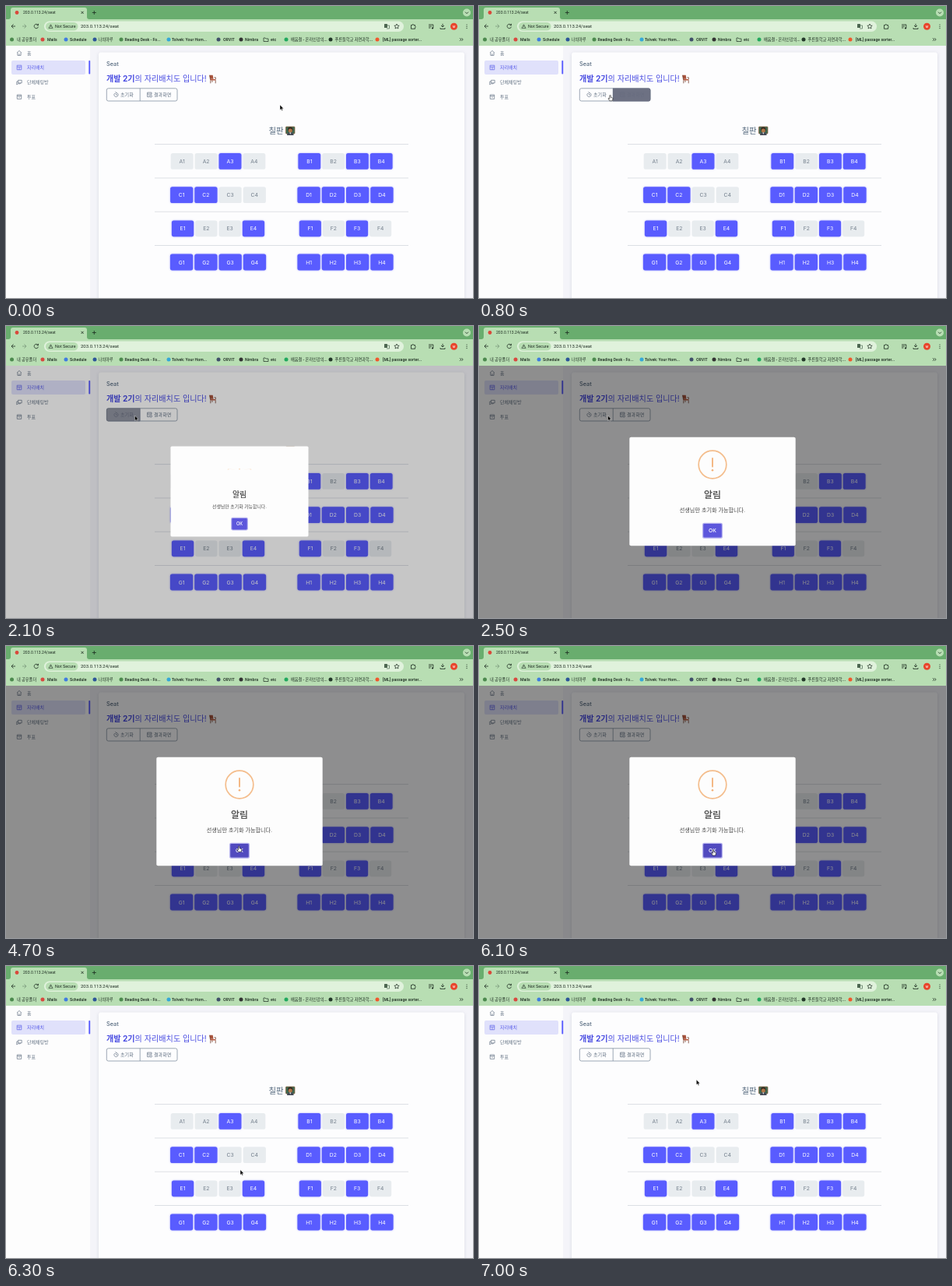
Write an HTML page that moves like this. It is 600 by 375 pixels and loops after 7700 ms.

```html
<!DOCTYPE html>
<html lang="ko">
<head>
<meta charset="utf-8">
<title>Seat</title>
<style>
html, body { margin: 0; width: 100%; height: 100%; overflow: hidden; background: #fff; }
svg { display: block; width: 100%; height: 100%; font-family: Inter, 'Noto Sans CJK KR', 'Noto Sans CJK', sans-serif; }
.chrome { font-family: Roboto, 'Noto Sans CJK KR', 'Noto Sans CJK', sans-serif; }
.bookmarks { font-weight: 500; }
.heavy { stroke: currentColor; stroke-width: .25; color: #444; }
.taken { filter: drop-shadow(0 .8px .9px rgba(90, 92, 255, .5)); }
.card { filter: drop-shadow(0 1px 2px rgba(67, 89, 113, .16)); }
</style>
</head>
<body>
<svg id="stage" viewBox="0 0 600 375"></svg>
<script>
const LOOP = 7700, STEP = 100;
const DARK = '#1c2b20', SLATE = '#637284', BLUE = '#595cff';

const rect = (x, y, w, h, fill, r = 0, more = '') =>
  `<rect x="${x}" y="${y}" width="${w}" height="${h}" rx="${r}" fill="${fill}" ${more}/>`;
const dot = (x, y, r, fill, more = '') => `<circle cx="${x}" cy="${y}" r="${r}" fill="${fill}" ${more}/>`;
const line = (d, color = DARK, width = .8, more = '') =>
  `<path d="${d}" fill="none" stroke="${color}" stroke-width="${width}" ${more}/>`;
const shape = (d, fill, more = '') => `<path d="${d}" fill="${fill}" ${more}/>`;
// y is the vertical middle of the text
const text = (x, y, size, fill, s, more = '') =>
  `<text x="${x}" y="${y + size * .36}" font-size="${size}" fill="${fill}" ${more}>${s}</text>`;
const centered = (x, y, size, fill, s, more = '') => text(x, y, size, fill, s, 'text-anchor="middle" ' + more);

function browser() {
  const marks = [
    [7.5, 14, '내 공유폴더', '#4c8a4e'], [47, 53, 'Mails', '#d8493f'], [77, 82, 'Schedule', '#3f7de0'],
    [114, 118.5, '나의마루', '#2c5698'], [148, 152.5, 'Reading Desk - Fo...', '#4c8a4e'],
    [209, 213, 'Tolvek: Your Hom...', '#35a8d8'], [273, 279, 'ORVIT', '#40506a'], [302, 307, 'Nimbra', '#333'],
    [334, 340, 'etc', ''], [360, 366, '배움결 - 온라인강의...', '#22a95f'],
    [417, 422.5, '푸른들학교 자연과학...', '#24382a'], [477, 484, '[ML] passage sorter...', '#f0582c']
  ];
  return `<g class="chrome">` +
    rect(0, 0, 600, 18, '#69ad6e') + rect(0, 17, 600, 34, '#b8deb3') +
    shape('M3 17Q6 17 6 14V5Q6 2 9 2H101Q104 2 104 5V14Q104 17 107 17Z', '#b8deb3') +
    dot(14, 8.5, 2.4, '#d9483b') + text(22, 8.5, 5.1, DARK, '203.0.113.24/seat') +
    line('M96.5 6.8l3.2 3.2m0-3.2l-3.2 3.2M110.8 8.5h5M113.3 6v5') +
    dot(592, 8.5, 5, '#b8deb3') + line('M590 7.7l2 2 2-2') +
    line('M12 26H7m2.5-2.6L7 26l2.5 2.6') + line('M21 26h5m-2.5-2.6L26 26l-2.5 2.6', '#79997a') +
    line('M41 24.3a2.7 2.7 0 1 0 .5 2.4M41.5 22.8v2h-2') +
    rect(49, 19.5, 462, 13.5, '#e0f2dc', 6.7) + rect(51, 21, 41.5, 10.5, '#b8deb3', 5.2) +
    line('M57.5 23.8l2.6 4.6h-5.2zM57.5 25.4v1.5', DARK, .6) +
    text(63, 26.2, 5.4, DARK, 'Not Secure') + text(96, 26.2, 6, DARK, '203.0.113.24/seat') +
    rect(486, 23, 4, 5, '#4d6751', .6) + line('M489 25h3.5v4H489', '#4d6751', .7) +
    line('M502 23l1 2.1 2.2.2-1.7 1.5.5 2.2-2-1.2-2 1.2.5-2.2-1.7-1.5 2.2-.2z', DARK, .7) +
    line('M520.5 24.5h1.6q.7-2.4 1.6 0h1.8v1.6q2 .8 0 1.6v1.6h-5z') +
    line('M543 24h6M543 26h4M543 28h2.5M548.8 24v4.5') + dot(548, 28.5, 1.1, DARK) +
    line('M561 22.8v4m-2-1.8l2 2 2-2M558 28v1.4h6V28') +
    dot(575.5, 26.3, 4.5, '#e8452c') + centered(575.5, 26.3, 4, '#fff', 'M') +
    [24, 26.3, 28.6].map(y => dot(592, y, .6, DARK)).join('') + `<g class="bookmarks">` +
    marks.map(([ix, x, s, color]) =>
      (color ? dot(ix, 43, 2.5, color) : line('M331 41h2l1 1h3v3.5h-6z', DARK, .7)) +
      text(x, 43, 5.2, DARK, s)).join('') + `</g>` +
    line('M583 41.2l1.8 1.8-1.8 1.8m2.4-3.6l1.8 1.8-1.8 1.8') + `</g>`;
}

function sidebar() {
  const item = (y, s, icon, color = SLATE) => line(icon, color, .7) + text(27, y, 6, color, s);
  return rect(0, 51, 108, 324, '#fdfdfd') + rect(7, 70, 95, 18, '#e0e1fb', 2) +
    rect(106.3, 70, 1.9, 17.5, BLUE, .8) +
    item(60.5, '홈', 'M14 60.2l3-2.8 3 2.8M14.9 59.8v3.6h4.2v-3.6M17 63.4v-2') +
    item(79, '자리배치', 'M14.2 76.2h5.6v5.6h-5.6zM14.2 78.2h5.6M17 78.2v3.6', '#595ce8') +
    item(98, '단체채팅방', 'M15.6 95.3h4.6v3.6h-4.6zM15.6 97h-1.8v4l1.5-1.2h3v-1') +
    item(116.5, '투표', 'M14.3 114h5.4v5.4h-5.4zM14.3 115.6h5.4M16.2 117.2h1.6');
}

function seats() {
  const widths = { A: 28.9, B: 28.8, C: 29.2, D: 29.3, E: 28.3, F: 28.1, G: 29.3, H: 29.3 };
  const free = 'A1 A2 A4 B2 C3 C4 E2 E3 F2 F4';
  let out = '';
  Object.entries(widths).forEach(([letter, w], i) => {
    const center = i % 2 ? 436 : 272.5, y = 189 + 43.2 * (i >> 1);
    for (let n = 0; n < 4; n++) {
      const name = letter + (n + 1), x = center + (n - 2) * (w + 2) + 1, open = free.includes(name);
      out += rect(x, y, w, 20.8, open ? '#e8ecef' : BLUE, 2.6, open ? '' : 'class="taken"') +
        centered(x + w / 2, y + 10.5, 6.8, open ? '#737f8c' : '#fff', name);
    }
  });
  return out;
}

function chair() {
  return shape('M261.5 88.8h4.2l.8 5h-4.2z', '#a8533c') + shape('M262.3 94h6.5l1 1.6h-7.2z', '#b8583d') +
    line('M262.8 95.5v3.8M269.2 95.5v3.8M265 95.5v2.3M261.6 88.8l1 6M267.5 91.8h1.8v2.6', '#74402f', .8);
}

function teacher() {
  return rect(359.5, 155, 11.5, 9, '#3f6b52', .8, 'stroke="#8a5a35" stroke-width=".7"') +
    shape('M361 166q0-4 4.3-4t4.3 4z', '#434a55') + dot(365.3, 158.8, 3.2, '#3a2820') +
    dot(365.3, 160, 2.5, '#b07748') + shape('M364.3 162.5h2l-1 2.6z', '#eee');
}

function page() {
  const rules = [177.6, 220.9, 264.1, 307.4].map(y => rect(191, y - .35, 326, .8, '#d5d9de')).join('');
  return rect(0, 51, 600, 324, '#f4f4f9') + sidebar() +
    rect(119, 59.5, 470, 330, '#fdfdfe', 3, 'class="card"') +
    text(129, 74, 7.3, '#566a7f', 'Seat', 'font-weight="500"') +
    text(129, 93.8, 10.1, '#4a4de2', '<tspan font-weight="700">개발 2기</tspan>의 자리배치도 입니다!') + chair() +
    rect(129.3, 105.8, 90.7, 16.2, 'none', 2.2, 'stroke="#8592a3" stroke-width=".8"') +
    line('M172.2 105.8v16.2', '#8592a3') +
    line('M139.6 112.2a2.6 2.6 0 1 0 2-.8m-1.2-1.2l1.3 1.2-1.3 1.2M141.7 112.8v1.4h1.2', SLATE, .7) +
    text(147, 114, 6.1, SLATE, '초기화') +
    line('M187 113.5v-2.4h-5.4v5.6h3M181.6 113h5.4M183 114.8h1.4', SLATE, .7) +
    dot(186.2, 115.8, 1.3, 'none', `stroke="${SLATE}" stroke-width=".7"`) +
    text(190, 114, 6.1, SLATE, '결과화면') +
    shape('M172.2 105.5H131.5Q129 105.5 129 108V120Q129 122.4 131.5 122.4H172.2Z', '#686c7e', 'id="hoverReset"') +
    shape('M172 105.5H218Q220.4 105.5 220.4 108V120Q220.4 122.4 218 122.4H172Z', '#686c7e', 'id="hoverResult"') +
    centered(347, 160.3, 10.4, '#566a7f', '칠판') + teacher() + rules + seats();
}

function modal() {
  return rect(0, 51, 600, 324, '#000', 0, 'id="shade"') + `<g id="popup">` +
    rect(193.3, 142.7, 213.4, 139.6, '#fdfdfd', 2) +
    `<g id="icon">` + dot(0, 0, 17.8, 'none', 'stroke="#f4bd8c" stroke-width="1.7"') +
    rect(-.9, -9, 1.8, 12.5, '#f3b178', .9) + dot(0, 7.2, 1.3, '#f3b178') + `</g>` +
    centered(300, 216.7, 11.9, '#444', '알림', 'class="heavy"') +
    centered(300, 236, 7.1, '#484848', '선생님만 초기화 가능합니다.') +
    rect(287.6, 253.3, 24.8, 18.9, '#5d57dc', 2, 'id="ok" stroke="#b6b3ef" stroke-width="1.3"') +
    centered(300, 262.8, 6.8, '#fff', 'OK', 'font-weight="500"') + `</g>`;
}

const cursors =
  shape('M0 0V6.6L1.5 5.2 2.5 7.4 3.5 7 2.6 4.8H4.6Z', '#000', 'id="arrow" stroke="#fff" stroke-width=".4"') +
  shape('M-.7 .4Q0-.4 .7 .4V2.8L2.9 3.4Q3.6 3.8 3.4 4.7L2.8 7.3H-.7L-2.5 4.5Q-2.3 3.5-1.4 4.1L-.7 4.8Z',
    '#fff', 'id="hand" stroke="#111" stroke-width=".6"');

document.getElementById('stage').innerHTML = page() + modal() + browser() + cursors;

const part = Object.fromEntries([...document.querySelectorAll('#stage [id]')].map(el => [el.id, el]));
const set = (name, attr, value) => part[name].setAttribute(attr, value);
const progress = (t, start, length) => Math.min(1, Math.max(0, (t - start) / length));
const mix = (a, b, p) => a + (b - a) * p;

// time, x, y of the pointer's tip
const route = [
  [0, 352, 127], [800, 168.5, 114.5], [1600, 165.5, 115], [3900, 165.5, 115], [4700, 299.3, 257],
  [4800, 299.3, 257], [5100, 301, 261.7], [6600, 301, 261.7], [7000, 279.3, 146], [LOOP, 279.3, 146]
];

function pointerAt(t) {
  const i = route.findIndex(stop => stop[0] > t), [t0, x0, y0] = route[i - 1], [t1, x1, y1] = route[i];
  const p = progress(t, t0, t1 - t0), eased = p * p * (3 - 2 * p);
  return [mix(x0, x1, eased), mix(y0, y1, eased)];
}

function popScale(p) {
  if (p < .45) return mix(.7, 1.05, p / .45);
  if (p < .8) return mix(1.05, .95, (p - .45) / .35);
  return mix(.95, 1, (p - .8) / .2);
}

function draw(t) {
  const leaving = progress(t, 6115, 150), open = t > 2050 && leaving < 1;
  const scale = popScale(progress(t, 2050, 300)) * (1 - leaving / 2);
  const flip = Math.cos((1 - progress(t, 2050, 400)) * 100 * Math.PI / 180);
  set('shade', 'opacity', .44 * (progress(t, 2050, 100) - progress(t, 6115, 110)));
  set('popup', 'opacity', open ? 1 - leaving : 0);
  set('popup', 'transform', `translate(300 212.5) scale(${scale}) translate(-300 -212.5)`);
  set('icon', 'transform', `translate(300 178) scale(1 ${flip})`);
  set('ok', 'fill', t > 4650 ? '#514abf' : '#5d57dc');

  set('hoverResult', 'opacity', .96 * (progress(t, 550, 150) - progress(t, 800, 200)));
  set('hoverReset', 'opacity', .96 * (progress(t, 800, 200) - progress(t, 2050, 200)));

  const overButton = (t >= 600 && t < 2100) || (t > 4650 && t < 6150);
  const place = `translate(${pointerAt(t)})`;
  for (const [name, shown] of [['hand', overButton], ['arrow', !overButton]]) {
    set(name, 'transform', place);
    set(name, 'opacity', shown ? 1 : 0);
  }
}

function tick() {
  draw(Math.floor(performance.now() % LOOP / STEP) * STEP);
  requestAnimationFrame(tick);
}
tick();
</script>
</body>
</html>
```
